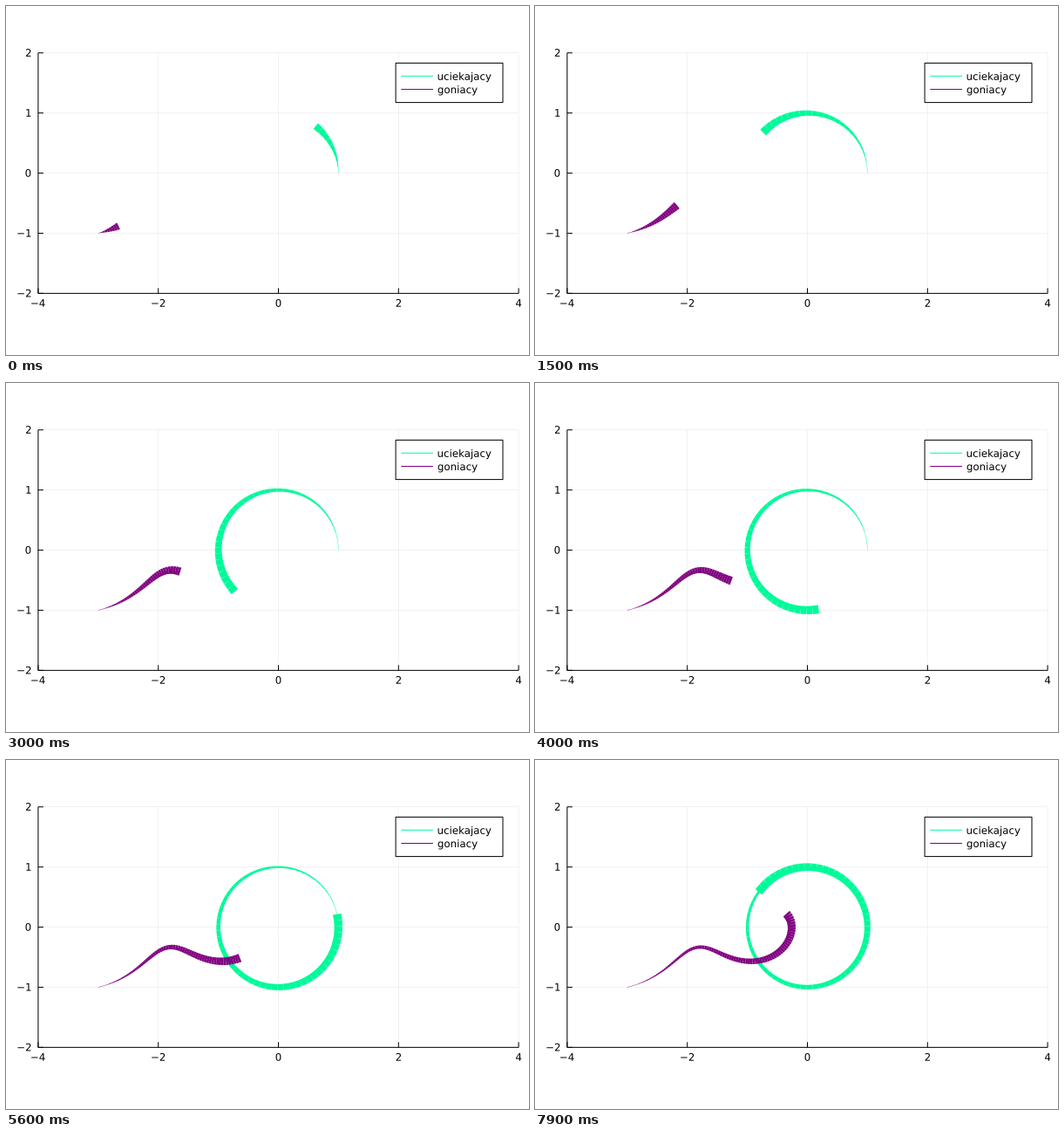
Animation, 600 px wide and 400 px high, one loop 8000 ms. Source, as a matplotlib script:

```python
import numpy as np
import matplotlib.pyplot as plt
from matplotlib.animation import FuncAnimation
from matplotlib.collections import LineCollection
from matplotlib.patches import PathPatch, Rectangle
from matplotlib.textpath import TextPath
from matplotlib.transforms import Affine2D

W, H, DPI = 600, 400, 100
FRAMES, INTERVAL = 80, 100
PX = 72 / DPI                    # one pixel in points
CX, CY, UNIT = 312.5, 191.55, 68.9
GREEN, PURPLE = "mediumspringgreen", "purple"
DT, STEP = 0.1, 0.04             # runner's angle and chaser's path per step
START = 10                       # points in the opening frame
MAX_WIDTH, MIN_WIDTH = 10, 0.4
FONT_SIZE = 11.8                 # pixels

plt.rcParams["font.family"] = "DejaVu Sans"


def to_px(p):
    return np.column_stack([CX + UNIT * p[:, 0], CY - UNIT * p[:, 1]])


def pursuit(target, pos):
    """Walk towards the moving target with constant speed."""
    path = [np.array(pos, float)]
    for goal in target[:-1]:
        gap = goal - path[-1]
        path.append(path[-1] + STEP * gap / np.hypot(*gap))
    return np.array(path)


angle = DT * np.arange(FRAMES + START)
runner = np.column_stack([np.cos(angle), np.sin(angle)])
chaser = pursuit(runner, (-3, -1))

fig = plt.figure(figsize=(W / DPI, H / DPI), dpi=DPI, facecolor="white")
ax = fig.add_axes([0, 0, 1, 1])
ax.set_xlim(0, W)
ax.set_ylim(H, 0)
ax.axis("off")


def line(x0, y0, x1, y1, color="black", z=4, width=1, **kw):
    ax.plot([x0, x1], [y0, y1], color=color, lw=width * PX, zorder=z,
            solid_capstyle="butt", snap=False, **kw)


def grid_line(*ends):
    line(*ends, z=1, width=0.5, alpha=0.1)


def label(x, y, text, align):
    """Place text at sub-pixel precision; align is 0 left, 0.5 centre, 1 right."""
    path = TextPath((0, 0), text, size=FONT_SIZE)
    box = path.get_extents()
    shift = x - box.x0 - align * box.width
    path = Affine2D().scale(1, -1).translate(shift, y + 4.1).transform_path(path)
    ax.add_patch(PathPatch(path, fc="black", lw=0, zorder=6, snap=False))


def tick_text(v):
    return str(v).replace("-", "\u2212")


left, right = CX - 4 * UNIT, CX + 4 * UNIT
top, bottom = CY - 2 * UNIT, CY + 2 * UNIT

for v in range(-4, 5, 2):
    x = CX + v * UNIT
    grid_line(x, top, x, bottom)
    line(x, bottom, x, bottom - 6)
    label(x, 340.6, tick_text(v), 0.5)
for v in range(-2, 3):
    y = CY - v * UNIT
    grid_line(left, y, right, y)
    line(left, y, left + 6, y)
    label(28.4, y, tick_text(v), 1)
line(left, top, left, bottom)
line(left, bottom, right, bottom)

ax.add_patch(Rectangle((447.1, 65.4), 122.9, 45.2, fc="white", ec="black",
                       lw=PX, zorder=5, snap=False))
for y, name, color in ((80.3, "uciekajacy", GREEN), (95.5, "goniacy", PURPLE)):
    line(453.3, y, 490, y, color, z=6)
    label(495.6, y + 0.4, name, 0)


def trail(points, color, z):
    lines = LineCollection([], colors=color, capstyle="butt", zorder=z)
    lines.set_snap(False)
    ax.add_collection(lines, autolim=False)
    return to_px(points), lines


trails = [trail(runner, GREEN, 2), trail(chaser, PURPLE, 3)]


def update(k):
    n = k + START
    width = np.maximum(MAX_WIDTH * np.arange(n - 1) / n, MIN_WIDTH) * PX
    for pts, lines in trails:
        lines.set_segments(np.stack([pts[:n - 1], pts[1:n]], axis=1))
        lines.set_linewidth(width)
    return [lines for _, lines in trails]


anim = FuncAnimation(fig, update, frames=FRAMES, interval=INTERVAL,
                     repeat=True, repeat_delay=0, blit=False)
plt.show()
```
